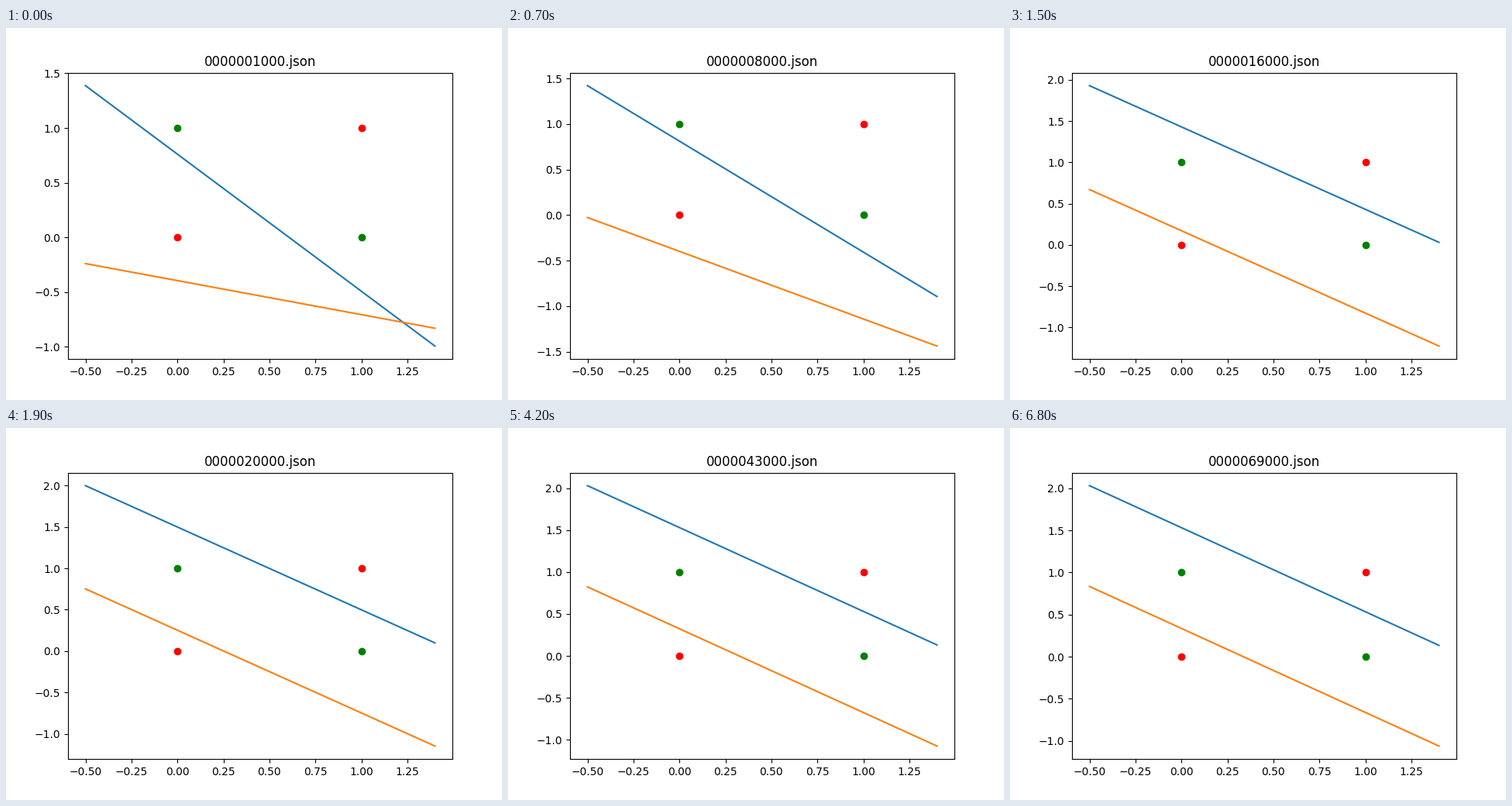
These frames come from a looping animation (640x480 px, 6.9 s). A matplotlib script:

```python
import numpy as np
import matplotlib.pyplot as plt
from matplotlib.animation import FuncAnimation

FRAMES = 69
STEP_MS = 100
EPOCHS = 1000  # training epochs between frames

plt.rcParams["text.kerning_factor"] = 6  # whole-pixel glyph advances


def mix(a, b, f):
    return a + (b - a) * f


def sigmoid(t, mid, rate):
    return 1 / (1 + np.exp(-rate * (t - mid)))


def swell(t, scale, power):
    """Slow start, then a fast settling."""
    return 1 - np.exp(-(t / scale) ** power)


def learn(t, onset, width, rate):
    """Soft onset followed by a long 1/t approach."""
    odds = rate * width * np.log1p(np.exp((t - onset) / width))
    return odds / (1 + odds)


def upper(t):
    slope = mix(-1.2526, -0.999, sigmoid(t, 8.81, 1.018))
    bias = mix(0.76 + 0.0013 * t, 1.5365, learn(t, 13.9, 1.52, 3.6))
    return slope, bias


def lower(t):
    slope = mix(-0.311, -0.9985, swell(t, 7.03, 2.94))
    bias = mix(-0.395 - 0.0025 * t, 0.353, learn(t, 11.35, 1.1, 0.9))
    return slope, bias


fig, ax = plt.subplots(figsize=(6.4, 4.8), dpi=100)
xs = np.arange(-0.5, 1.5, 0.1)


def draw(frame):
    ax.clear()
    ax.plot([0, 1], [0, 1], "ro")
    ax.plot([0, 1], [1, 0], "go")
    for line, color in ((upper, "C0"), (lower, "C1")):
        slope, bias = line(frame)
        ax.plot(xs, slope * xs + bias, color=color)
    ax.set_title(f"{(frame + 1) * EPOCHS:010d}.json")


anim = FuncAnimation(fig, draw, frames=FRAMES, init_func=lambda: None,
                     interval=STEP_MS, repeat=True)
plt.show()
```
